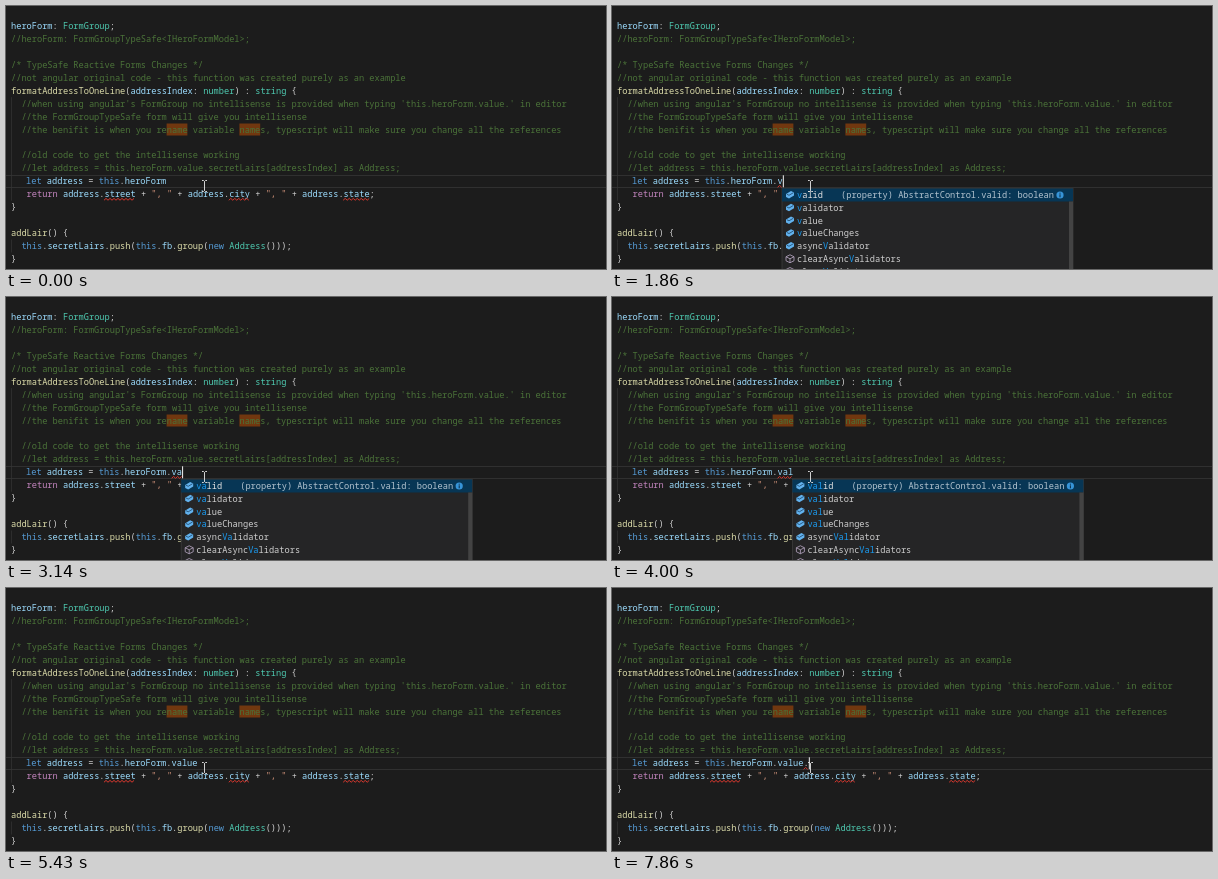
Recreate the animation shown at these times as an HTML page. Size 600 by 263 pixels, loop 8000 ms.

```html
<!DOCTYPE html>
<html lang="en">
<head>
<meta charset="utf-8">
<style>
  html, body { margin: 0; width: 100%; height: 100%; overflow: hidden; background: #1c1c1c; }
  svg { display: block; width: 100%; height: 100%; }
  text { font: 8.667px "Noto Sans Mono", "DejaVu Sans Mono", monospace; white-space: pre; }
</style>
</head>
<body>
<svg id="stage" viewBox="0 0 600 263"></svg>
<script>
const LOOP = 8000, CHAR = 5.2, ROW = 12.94, LEFT = 5, EDIT_ROW = 12, EDIT_X = 20;
const COLORS = {
  comment: '#4b7339', string: '#ce9178', keyword: '#569cd6', flow: '#c586c0',
  type: '#4ec9b0', call: '#dcdcaa', name: '#9cdcfe', plain: '#d0d0d0'
};
const note = s => '/'.repeat(2) + s;
const LINES = [
  [0, 'heroForm: FormGroup;'],
  [0, note('heroForm: FormGroupTypeSafe<IHeroFormModel>;')],
  [0, ''],
  [0, '/* TypeSafe Reactive Forms Changes */'],
  [0, note('not angular original code - this function was created purely as an example')],
  [0, 'formatAddressToOneLine(addressIndex: number) : string {'],
  [2, note("when using angular's FormGroup no intellisense is provided when typing 'this.heroForm.value.' in editor")],
  [2, note('the FormGroupTypeSafe form will give you intellisense')],
  [2, note('the benifit is when you rename variable names, typescript will make sure you change all the references')],
  [0, ''],
  [2, note('old code to get the intellisense working')],
  [2, note('let address = this.heroForm.value.secretLairs[addressIndex] as Address;')],
  [3, ''],
  [3, 'return address.street + ", " + address.city + ", " + address.state;'],
  [0, '}'],
  [0, ''],
  [0, 'addLair() {'],
  [2, 'this.secretLairs.push(this.fb.group(new Address()));'],
  [0, '}']
];
const BASE = 'let address = this.heroForm';
// [time, text after BASE, completion list open]
const KEYS = [
  [-560, '', 0], [1290, '.', 0], [1860, '.v', 1], [2140, '.va', 1],
  [3430, '.val', 1], [4900, '.value', 0], [5860, '.value.', 0]
];
const ITEMS = ['valid', 'validator', 'value', 'valueChanges', 'asyncValidator',
  'clearAsyncValidators', 'clearValidators'];

const stage = document.getElementById('stage');
const rowY = i => 20 + i * ROW;
const esc = s => s.replace(/&/g, '&amp;').replace(/</g, '&lt;');
const rect = (x, y, w, h, fill, more = '') =>
  `<rect x="${x}" y="${y}" width="${w}" height="${h}" fill="${fill}" ${more}/>`;
const span = (s, fill) => `<tspan fill="${fill}">${esc(s)}</tspan>`;
const text = (x, y, body) => `<text x="${x}" y="${y + 3}">${body}</text>`;

function colorOf(word, next) {
  if (/^[/][/*]/.test(word)) return COLORS.comment;
  if (word[0] === '"') return COLORS.string;
  if (/^(let|this|new)$/.test(word)) return COLORS.keyword;
  if (word === 'return') return COLORS.flow;
  if (/^(number|string|[A-Z]\w*)$/.test(word)) return COLORS.type;
  if (/^\w/.test(word)) return next === '(' ? COLORS.call : COLORS.name;
  return COLORS.plain;
}

function highlight(code) {
  return code.replace(/[/][/*].*|"[^"]*"|\w+|[^\w"]/g,
    (word, at) => span(word, colorOf(word, code[at + word.length])));
}

function squiggle(x, y, chars) {
  let d = `M${x} ${y}`;
  for (let i = 1; i * 2 <= chars * CHAR; i++) d += `l2 ${i % 2 ? -1.8 : 1.8}`;
  return `<path d="${d}" fill="none" stroke="#d8392f" stroke-width="1"/>`;
}

function cube(x, y, method) {
  const top = `M${x} ${y - 2}l4-2 4 2-4 2z`;
  const sides = `M${x} ${y - 2}v4l4 2 4-2v-4M${x + 4} ${y}v4`;
  return method
    ? `<path d="${top}${sides}" fill="none" stroke="#b9a9c4" stroke-width=".8"/>`
    : `<path d="M${x} ${y - 1}l5-3 3 1.5v3l-5 3-3-1.5z" fill="#62b2ee"/>
       <path d="M${x + .8} ${y - .8}l2.2 1.1 4.4-2.6" fill="none" stroke="#1d4566" stroke-width=".8"/>`;
}

function menu(x, typed) {
  const y0 = 182.5, rows = ITEMS.map((item, i) => {
    const y = y0 + 6.5 + i * 12.75, at = item.toLowerCase().indexOf(typed);
    const end = at + typed.length, base = i ? '#cfcfcf' : '#e4e4e4';
    return cube(x + 4, y, i > 4) + text(x + 15, y,
      span(item.slice(0, at), base) + span(item.slice(at, end), '#1b9bf0') + span(item.slice(end), base));
  });
  return rect(x, y0, 291, 90, '#252526', 'stroke="#3c3c3c" stroke-width=".8"') +
    rect(x, y0, 291, 13, '#073655') + rows.join('') +
    text(x + 59, y0 + 6.5, span('(property) AbstractControl.valid: boolean', '#b4c4d0')) +
    `<circle cx="${x + 278}" cy="${y0 + 6.5}" r="3.6" fill="#3794d8"/>` +
    rect(x + 277.5, y0 + 5.8, 1, 3, '#0b2c45') + rect(x + 277.5, y0 + 4.2, 1, 1, '#0b2c45') +
    rect(x + 287, y0 + 13, 4, 80, '#434343');
}

const guide = (x, from, to) =>
  rect(x, rowY(from) - ROW / 2, .7, (to - from + 1) * ROW, '#363636');
const match = col => rect(15 + col * CHAR, rowY(8) - 6, 4 * CHAR, 12, '#71370f');
const editY = rowY(EDIT_ROW);
const backdrop = rect(0, 0, 600, 263, '#1c1c1c') +
  rect(0, editY - 6.2, 600, .9, '#323232') + rect(0, editY + 5.8, 600, .9, '#323232') +
  guide(LEFT, 6, 13) + guide(LEFT, 17, 17) + match(28) + match(42) +
  LINES.map(([indent, code], i) => text(LEFT + indent * CHAR, rowY(i), highlight(code))).join('');
const errors = [[15, 6], [39, 4], [61, 5]]
  .map(([col, n]) => squiggle(EDIT_X + col * CHAR, rowY(13) + 6, n)).join('');
const pointer = `<path d="M196 174.5h1.5l1 1 1-1h1.5M198.5 175.5v9M196 185.5h1.5l1-1 1 1h1.5"
  fill="none" stroke="#e6e6e6" stroke-width=".9"/>`;

function draw(t) {
  const [since, tail, open] = KEYS.filter(k => k[0] <= t).pop();
  const code = BASE + tail, end = EDIT_X + code.length * CHAR;
  const caretOn = Math.floor((t - since) / 500) % 2 === 0;
  let out = backdrop + text(EDIT_X, editY, highlight(code));
  if (!open) out += errors;
  if (open) out += squiggle(EDIT_X + 28 * CHAR, editY + 6, tail.length - 1) + menu(end - .8, tail.slice(1));
  if (tail.endsWith('.')) out += squiggle(end - CHAR, editY + 6, 1);
  if (caretOn) out += rect(end, editY - 6, 1.1, 12, '#e0e0e0');
  stage.innerHTML = out + pointer;
}

function tick() {
  draw(performance.now() % LOOP);
  requestAnimationFrame(tick);
}
tick();
</script>
</body>
</html>
```
